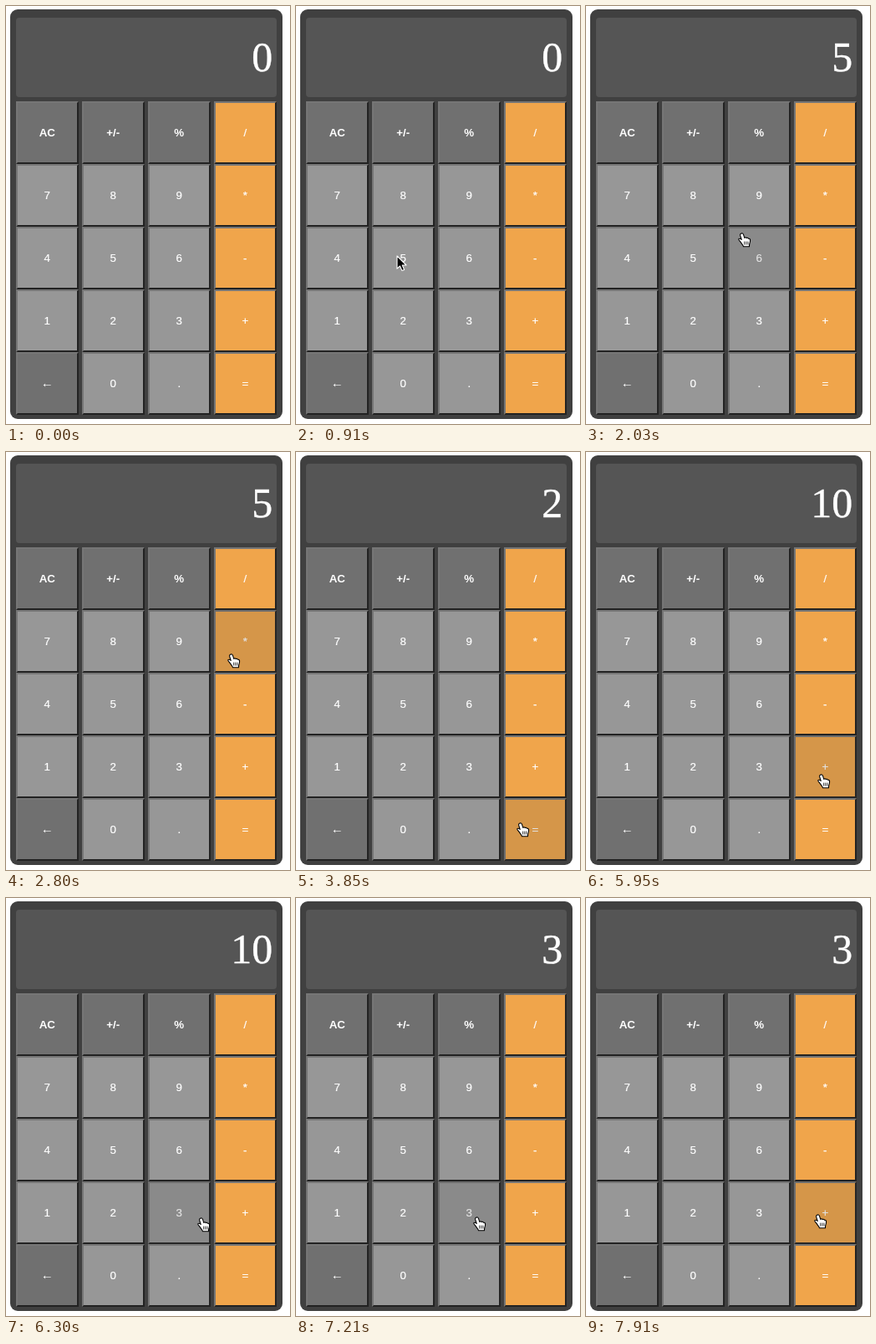
Recreate the animation shown at these times as an HTML page. Size 340x500 px, loop 8000 ms.

```html
<!DOCTYPE html>
<html lang="en">
<head>
<meta charset="utf-8">
<title>Calculator</title>
<style>
  html, body { margin: 0; width: 100%; height: 100%; overflow: hidden; background: #fff; }
  svg { display: block; }
  text { fill: #fff; }
  .key text { font: 13.33px "Liberation Sans", Arial, sans-serif; text-anchor: middle; stroke: #fff; stroke-width: .2; }
  .key.fn text { font-weight: bold; stroke: none; }
  .key text.arrow { font-size: 15px; }
  #value { font: 50px "Liberation Serif", Times, serif; text-anchor: end; stroke: #fff; stroke-width: .4; }
</style>
</head>
<body>
<svg width="340" height="500" viewBox="0 0 340 500">
  <rect x="5" y="4" width="326" height="490" rx="9" fill="#404040"/>
  <rect x="12" y="14" width="312" height="95" rx="4" fill="#555"/>
  <text id="value" x="319.2" y="78">0</text>
  <g id="keys"></g>
  <path id="arrow" d="M0 0V15.2L3.5 12L6 17.6L8.6 16.5L6.2 11H11Z" fill="#000" stroke="#fff" stroke-width="1.1" stroke-linejoin="round"/>
  <g id="hand" stroke="#000" stroke-linecap="round" stroke-linejoin="round">
    <path d="M3.5 1.2C4.8 .4 6.1 1.1 6.5 2.3L7.8 6.4C8.4 5.4 9.8 5.5 10.2 6.6C11 5.9 12.2 6.3 12.5 7.3C13.6 6.9 14.5 7.6 14.6 8.9C14.8 11.2 14.3 12.6 13.6 14.2L13.5 16.8H6.5C6.2 15 4.2 13.1 3.1 11.4C2.2 10.1 .6 9 .8 7.9C1.1 6.8 2.9 7 4.2 8.5L2.7 3.6C2.3 2.5 2.6 1.6 3.5 1.2Z" fill="#fff" stroke-width="1.1"/>
    <path d="M7.7 11V14.2M9.8 11V14.2M11.9 11V14.2" fill="none" stroke-width=".8"/>
  </g>
</svg>
<script>
const NS = 'http://www.w3.org/2000/svg';
const $ = id => document.getElementById(id);
const LOOP = 8000, STEP = 70, SIZE = 75;
const LIGHT = '#767676', DARK = '#222';

function add(parent, tag, attrs) {
  const el = document.createElementNS(NS, tag);
  for (const k in attrs) el.setAttribute(k, attrs[k]);
  return parent.appendChild(el);
}

const rows = [
  ['AC', '+/-', '%', '/'],
  ['7', '8', '9', '*'],
  ['4', '5', '6', '-'],
  ['1', '2', '3', '+'],
  ['←', '0', '.', '=']
];

function makeKey(label, col, row) {
  const x = 12 + col * 79, y = 114 + row * SIZE;
  const fn = col < 3 && (row === 0 || label === '←');
  const fill = col === 3 ? '#f0a54b' : fn ? '#707070' : '#979797';
  const g = add($('keys'), 'g', { class: fn ? 'key fn' : 'key', transform: `translate(${x} ${y})` });
  add(g, 'rect', { width: SIZE, height: SIZE, fill });
  const top = add(g, 'path', { d: 'M0 0H75L73 2H2V73L0 75Z' });
  const low = add(g, 'path', { d: 'M75 75H0L2 73H73V2L75 0Z' });
  const text = add(g, 'text', { x: 37.3, y: 42 });
  text.textContent = label;
  if (label === '←') text.setAttribute('class', 'arrow');
  return { label, x, y, g, top, low };
}

const keys = rows.flatMap((row, r) => row.map((label, c) => makeKey(label, c, r)));

const ease = {
  in: u => u * u,
  out: u => u * (2 - u),
  both: u => u * u * (3 - 2 * u),
  lin: u => u
};

// time, x, y, easing of the way there
const path = [
  [70, 300, 440, 'lin'],
  [700, 123, 302, 'out'],
  [770, 123, 302, 'lin'],
  [910, 121, 299, 'both'],
  [1820, 121, 299, 'lin'],
  [2310, 286, 230, 'both'],
  [2590, 286, 230, 'lin'],
  [2800, 269, 242, 'in'],
  [3220, 130, 384, 'out'],
  [3570, 130, 384, 'lin'],
  [3850, 268, 444, 'both'],
  [4060, 282, 448, 'out'],
  [4970, 282, 448, 'lin'],
  [5040, 282, 431, 'lin'],
  [5390, 285, 386, 'out'],
  [5880, 285, 386, 'lin'],
  [6300, 233, 383, 'both'],
  [6650, 211, 382, 'out'],
  [7070, 211, 382, 'lin'],
  [7910, 277, 379, 'both']
];

const presses = [[1610, 1680], [2450, 2520], [3290, 3430], [4480, 4550], [6930, 7000]];
const values = [[0, '0'], [1680, '5'], [3430, '2'], [4550, '10'], [7000, '3']];
const FOCUS = 1260;

function pointer(t) {
  const i = path.findIndex(p => p[0] > t);
  if (i < 0) return path[path.length - 1].slice(1, 3);
  const [t0, x0, y0] = path[i - 1], [t1, x1, y1, mode] = path[i];
  const u = ease[mode]((t - t0) / (t1 - t0));
  return [x0 + (x1 - x0) * u, y0 + (y1 - y0) * u];
}

function place(el, x, y, shown) {
  el.setAttribute('visibility', shown ? 'visible' : 'hidden');
  el.setAttribute('transform', `translate(${x} ${y})`);
}

function draw(t) {
  const shown = t >= path[0][0];
  const [x, y] = shown ? pointer(t).map(Math.round) : [0, 0];
  const over = t >= FOCUS && keys.find(k =>
    x >= k.x && x < k.x + SIZE && y >= k.y && y < k.y + SIZE);
  const down = presses.some(([a, b]) => t >= a && t < b);

  for (const k of keys) {
    const sunk = down && k === over;
    k.g.setAttribute('opacity', k === over ? .85 : 1);
    k.top.setAttribute('fill', sunk ? DARK : LIGHT);
    k.low.setAttribute('fill', sunk ? LIGHT : DARK);
  }
  $('value').textContent = values.filter(v => v[0] <= t).pop()[1];
  place($('arrow'), x, y, shown && !over);
  place($('hand'), x - 4, y - 1, shown && over);
}

const start = performance.now();
function tick() {
  const t = (performance.now() - start) % LOOP;
  draw(Math.min(Math.floor(t / STEP) * STEP, 7910));
  requestAnimationFrame(tick);
}
draw(0);
requestAnimationFrame(tick);
</script>
</body>
</html>
```
